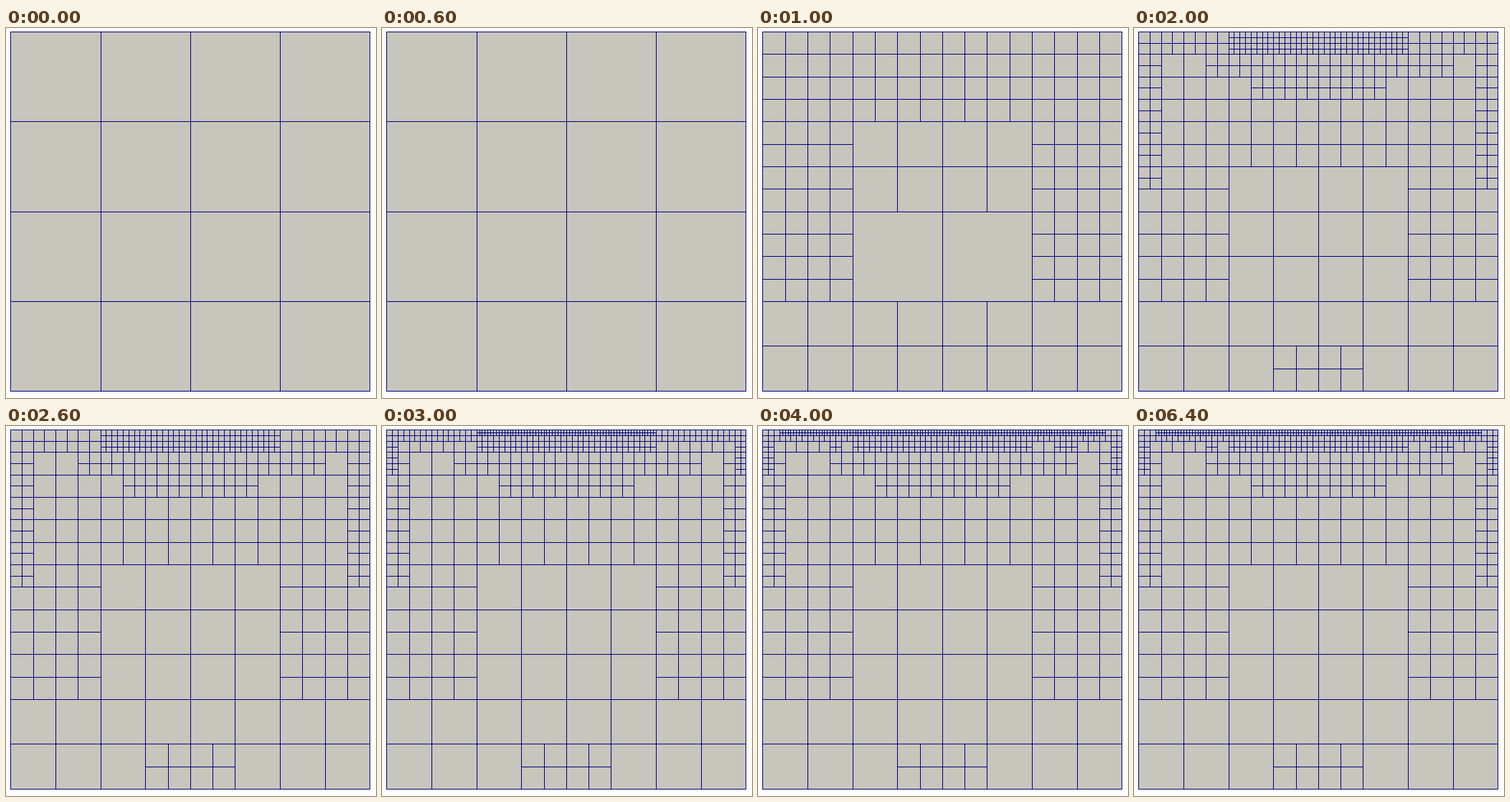
Write an HTML page with a canvas that moves like this. It is 516x516 px and loops after 8 s.

```html
<!DOCTYPE html>
<html>
<head>
<meta charset="utf-8">
<title>Adaptive mesh refinement</title>
<style>
  html, body { margin: 0; width: 516px; height: 516px; overflow: hidden; background: #fff; }
  canvas { display: block; }
</style>
</head>
<body>
<canvas id="stage" width="516" height="516"></canvas>
<script>
const ctx = document.getElementById('stage').getContext('2d');

// The square is SIDE units wide; positions snap to whole pixels.
const SIDE = 128, UNIT = 501 / SIDE;
const px = u => Math.round(6.35 + u * UNIT);
const py = u => Math.round(5.07 + u * UNIT);

// Decides whether a cell is divided into four at the given refinement step.
function splits(x, y, size, step) {
  const middle = x + size / 2;
  const wall = Math.min(x, SIDE - x - size);       // distance to the nearer side wall
  const offset = Math.abs(middle - SIDE / 2);      // distance from the vertical axis
  const drift = Math.abs(middle - SIDE / 2 - 3);   // the same, from the vortex axis

  switch (size) {
    case 128:
    case 64:
      return true;
    case 32:
      return step > 1 || step === 1 && (wall < 32 || y !== 64);
    case 16:
      return y < 32 || wall < 32 && y < 96 ||
        step > 1 && (y < 48 || y === 112 && offset < 16);
    case 8: // side layers, and a wedge hanging from the lid
      return step > 1 && (wall < 8 && y < 56 || drift < 2.9 * (24 - y));
    case 4: // lid and corner layers
      return y < 8 && offset < 32 ||
        step > 2 && (y < 4 || wall < 4 && y < 16) ||
        step > 3 && y < 8 && Math.abs(drift - 41) < 3;
    case 2:
      return step > 2 && y < 2 && offset < (step > 3 ? 58 : 32);
  }
  return false;
}

function drawCell(x, y, size, step) {
  if (splits(x, y, size, step)) {
    const half = size / 2;
    for (const dx of [0, half])
      for (const dy of [0, half]) drawCell(x + dx, y + dy, half, step);
  } else {
    const left = px(x) + 1, top = py(y) + 1;
    ctx.fillRect(left, top, px(x + size) - left, py(y + size) - top);
  }
}

function draw(step) {
  // Navy shows through the one-pixel gaps between the cells.
  ctx.fillStyle = '#000080';
  ctx.fillRect(px(0), py(0), px(SIDE) - px(0) + 1, py(SIDE) - py(0) + 1);
  ctx.fillStyle = '#c8c5bc';
  drawCell(0, 0, SIDE, step);
}

let shown = -1;
function tick() {
  const step = Math.min(4, Math.floor(performance.now() % 8000 / 1000));
  if (step !== shown) draw(shown = step);
  requestAnimationFrame(tick);
}
tick();
</script>
</body>
</html>
```
